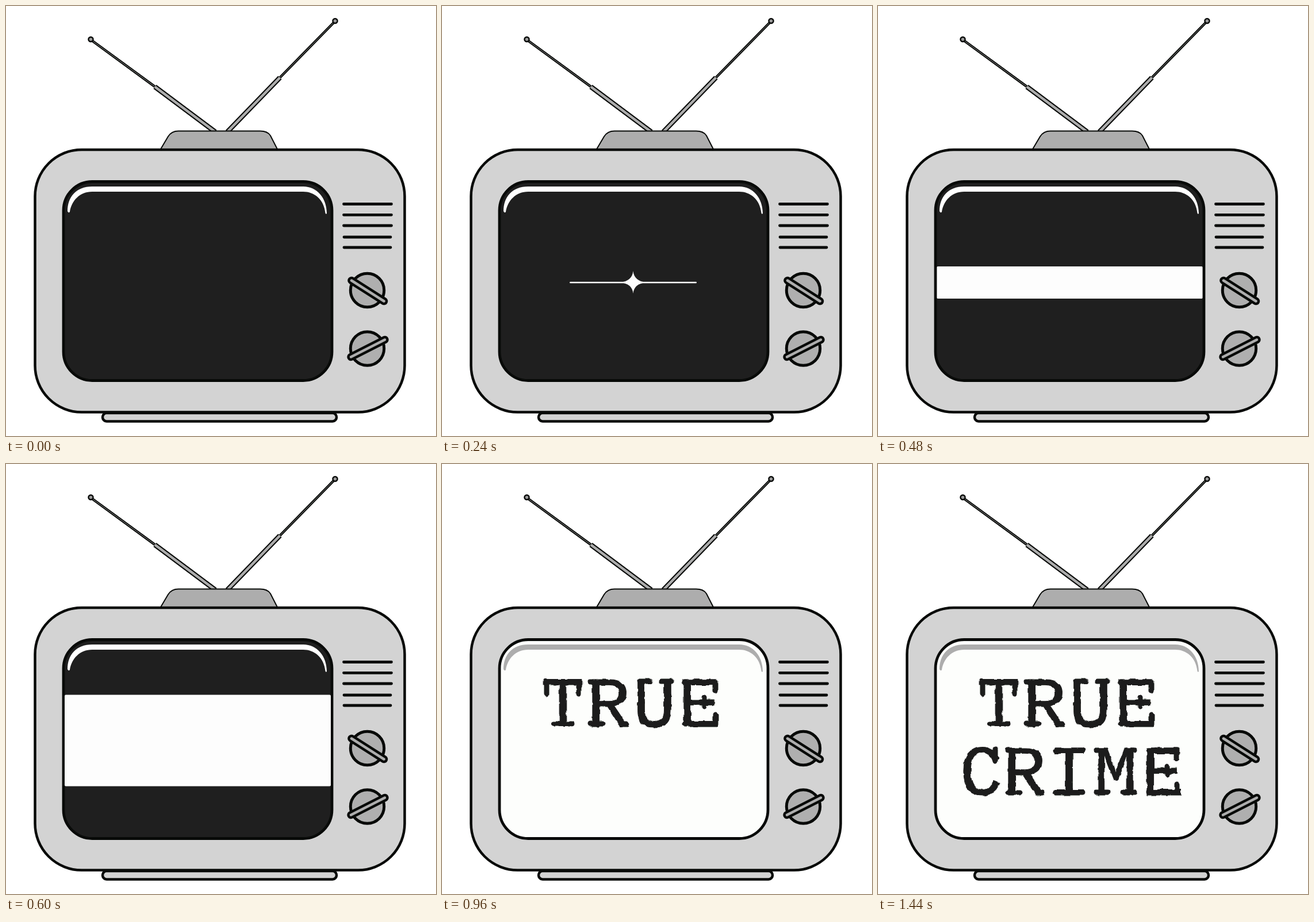
Write an HTML page that moves like this. It is 748 by 748 pixels and loops after 2.16 s.

```html
<!DOCTYPE html>
<html lang="en">
<head>
<meta charset="utf-8">
<title>Television</title>
<style>
  html, body { margin: 0; width: 100%; height: 100%; overflow: hidden; background: #fff; }
  svg { display: block; width: 100%; height: 100%; }
  .scene { opacity: 0; }
  .ink { stroke: #080a08; fill: none; }
  .grey { stroke: #adadad; fill: none; }
  .round { stroke-linecap: round; }
  .word { fill: #1d1e1c; stroke: #1d1e1c; }
  .word text { font: 125px "Liberation Mono", monospace; stroke-width: 1; }
  .word path { fill: none; stroke-width: 9; stroke-linecap: round; stroke-linejoin: round; }
</style>
</head>
<body>
<svg viewBox="0 0 748 748">
  <defs>
    <filter id="worn" x="-5%" y="-10%" width="110%" height="120%">
      <feTurbulence type="fractalNoise" baseFrequency=".08" numOctaves="2" seed="4" result="noise"/>
      <feDisplacementMap in="SourceGraphic" in2="noise" scale="5" xChannelSelector="R" yChannelSelector="G"/>
    </filter>
    <path id="glare" d="M107 357C107 332 122 314 150 314H517C541 314 558 334 558 361Q556 363 555.5 360C553 336 536 323 517 323H150C128 323 114 339 111 358Q109 361 107 357Z"/>
    <path id="star" d="M332.5 461Q334 478 355 481Q334 483 332.5 500Q331 483 310 481Q331 478 332.5 461Z"/>
  </defs>

  <!-- antenna -->
  <g id="rods"></g>
  <g class="ink" stroke-width="2.5">
    <circle cx="147.5" cy="58" r="4" style="fill:#999"/>
    <circle cx="572.5" cy="26" r="4" style="fill:#999"/>
    <path d="M269 249L282 227Q288 217.500 300 217.500H442Q455 217.500 460 225.500L472 249Z" stroke-width="2" style="fill:#adadad"/>
  </g>

  <!-- cabinet -->
  <g class="ink">
    <rect x="168" y="708" width="407" height="14.500" rx="7" stroke-width="4.500" style="fill:#d3d3d3"/>
    <rect x="50.500" y="250" width="643" height="456.500" rx="81" stroke-width="4.500" style="fill:#d3d3d3"/>
    <path class="round" stroke-width="4.800" d="M587.500 344.500H670.500M587.500 363.300H670.500M587.500 382H670.500M588 402H669M588 420H669"/>
  </g>
  <g id="knobs"></g>

  <!-- screen -->
  <rect x="100" y="305.500" width="467" height="346" rx="50" fill="#1f1f1f"/>
  <use href="#glare" fill="#fff"/>
  <g fill="#fdfdfd">
    <use class="scene" data-from="120" data-to="240" href="#star"/>
    <g class="scene" data-from="240" data-to="360">
      <use href="#star"/><rect x="222" y="479.700" width="221" height="2.600" rx="1.300"/>
    </g>
    <g class="scene" data-from="360" data-to="480">
      <use href="#star"/><rect x="113" y="479.700" width="433" height="2.600" rx="1.300"/>
    </g>
    <rect class="scene" data-from="480" data-to="600" x="102" y="453" width="463" height="56" rx="2"/>
  </g>
  <g class="scene" data-from="720" data-to="2160">
    <rect x="100" y="305.500" width="467" height="346" rx="50" fill="#fdfefc"/>
    <use href="#glare" fill="#adadad"/>
  </g>
  <rect class="ink" x="100" y="305.500" width="467" height="346" rx="50" stroke-width="4.800"/>
  <rect class="scene" data-from="600" data-to="720" x="102" y="401.500" width="463" height="159" rx="2" fill="#fdfdfd"/>

  <!-- typewriter words: text with slab serifs added -->
  <g class="scene" data-from="960" data-to="2160">
    <g class="word" filter="url(#worn)">
      <text x="172.500 252 332 411" y="456.500">TRUE</text>
      <path d="M182 379V400M238 379V400M195 452H226M258 379H270M258 452H280M314 452H320M344 378H361M382 378H400M421 379H475V394M421 452H476V437M456 407V421"/>
    </g>
  </g>
  <g class="scene" data-from="1440" data-to="2160">
    <g class="word" filter="url(#worn)">
      <text x="142 217 295 376 458" y="575.500">CRIME</text>
      <path d="M204 497V517M226 498H236M226 571H247M279 571H285M309 498H356M309 571H356M380 498H392M433 498H446M380 571H400M427 571H447M471 498H519V512M471 571H520V557M503 526V540"/>
    </g>
  </g>
</svg>
<script>
  const LOOP = 2160;

  // A black line with a narrower grey core.
  const bar = (d, outer, inner, cap = '') =>
    `<path class="ink ${cap}" d="${d}" stroke-width="${outer}"/>` +
    `<path class="grey ${cap}" d="${d}" stroke-width="${inner}"/>`;

  document.getElementById('rods').innerHTML =
    bar('M150 60.5L260 141', 4.6, 0.8) +
    bar('M570 29L476 125', 4.6, 0.8) +
    bar('M259 140.5L364 219', 8.5, 4.5) +
    bar('M476.5 124.5L385 219', 8.5, 4.5);

  const knob = (y, handle) =>
    `<circle class="ink" cx="628.5" cy="${y}" r="29.2" stroke-width="5" style="fill:#afafaf"/>` +
    bar(handle, 13.5, 4.5, 'round');

  document.getElementById('knobs').innerHTML =
    knob(494.5, 'M601 477.5L657.5 513.5') +
    knob(596, 'M600 610.5L659 580.5');

  for (const scene of document.querySelectorAll('.scene')) {
    const from = scene.dataset.from / LOOP;
    const to = scene.dataset.to / LOOP;
    scene.animate([
      { opacity: 0, offset: 0 },
      { opacity: 0, offset: from },
      { opacity: 1, offset: from },
      { opacity: 1, offset: to },
      ...(to < 1 ? [{ opacity: 0, offset: to }, { opacity: 0, offset: 1 }] : [])
    ], { duration: LOOP, iterations: Infinity });
  }
</script>
</body>
</html>
```
